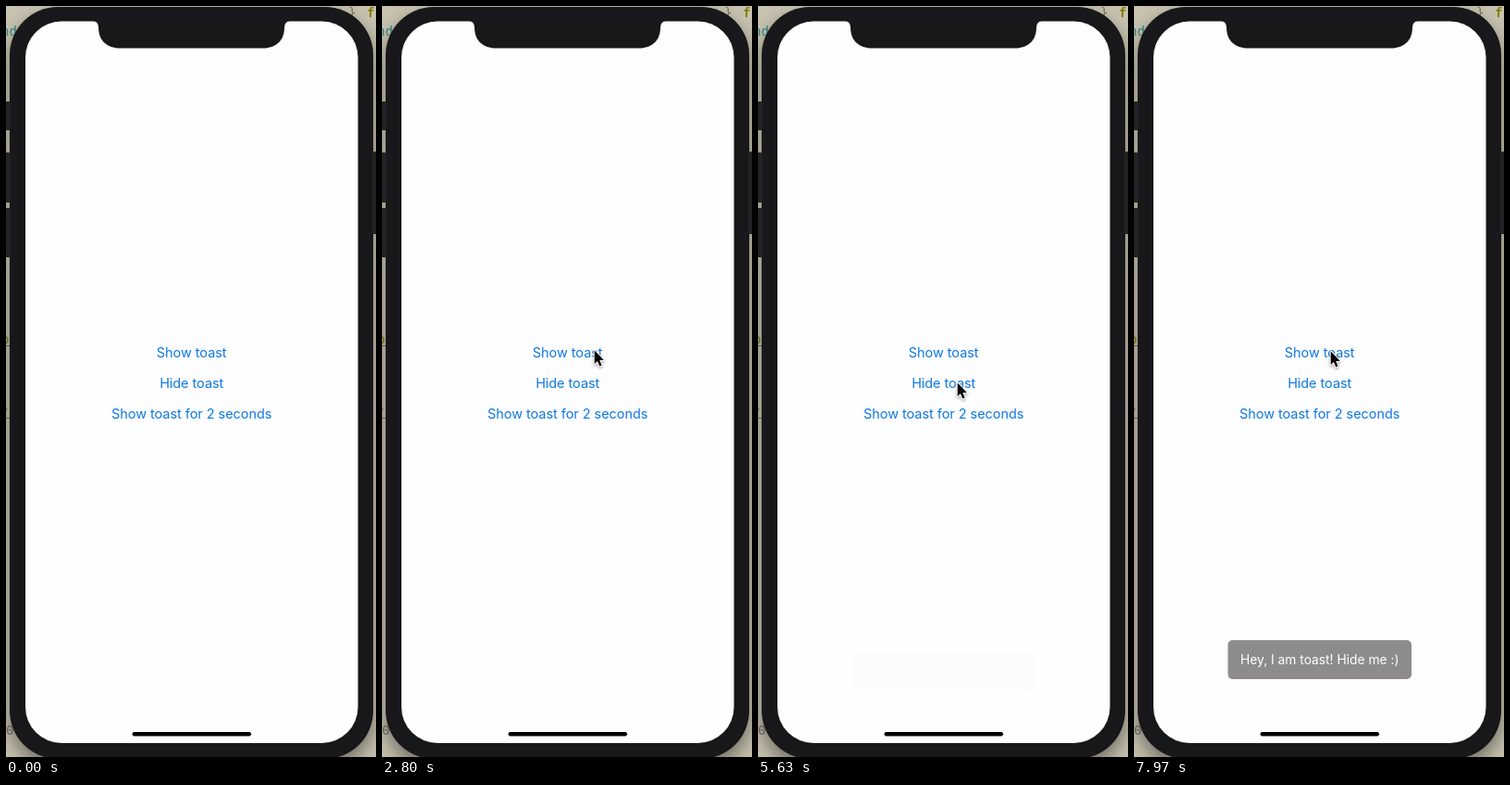
An HTML page with a canvas for the animation above (8000 ms loop, 400 by 810 pixels).

```html
<!DOCTYPE html>
<html lang="en">
<head>
<meta charset="utf-8">
<title>Toast demo</title>
<style>
  html, body { margin: 0; width: 100%; height: 100%; overflow: hidden; background: #c8c3b0; }
  canvas { display: block; width: 400px; height: 810px; }
</style>
</head>
<body>
<canvas id="stage"></canvas>
<script>
const W = 400, H = 810, LOOP = 8000, FADE = 350;
const BEZEL = '#18171a', BLUE = '#0b78e3', SCREEN = '#fefdff';
const SANS = 'Inter, Roboto, sans-serif', MONO = '"DejaVu Sans Mono", monospace';

const canvas = document.getElementById('stage');
const ctx = canvas.getContext('2d');
const dpr = window.devicePixelRatio || 1;
canvas.width = W * dpr;
canvas.height = H * dpr;

const buttons = [
  { label: 'Show toast', y: 378.7, clicks: [2940, 7000] },
  { label: 'Hide toast', y: 411.6, clicks: [5300] },
  { label: 'Show toast for 2 seconds', y: 444.5, clicks: [] }
];

// Pointer stops: time, x, y
const path = [
  [1230, 400, 471], [1640, 283, 399], [1830, 266, 381], [2150, 255, 376],
  [2700, 229, 372], [4300, 229, 372], [4950, 215, 407], [5900, 215, 407],
  [6570, 213, 386], [6850, 212, 373], [LOOP, 212, 373]
];

const clamp = v => Math.min(1, Math.max(0, v));
const smooth = v => { const k = clamp(v); return k * k * (3 - 2 * k); };
const mix = (a, b, k) => a + (b - a) * k;

function box(x, y, w, h, r, fill) {
  ctx.fillStyle = fill;
  ctx.beginPath();
  ctx.roundRect(x, y, w, h, r);
  ctx.fill();
}

function text(str, x, y, font, color, align = 'left') {
  ctx.font = font;
  ctx.fillStyle = color;
  ctx.textAlign = align;
  ctx.fillText(str, x, y);
}

function backdrop() {
  ctx.fillStyle = '#c8c3b0';
  ctx.fillRect(0, 0, W, H);
  text('nd', -5, 32, '14px ' + MONO, '#2f8580');
  text('}', 370, 12, '14px ' + MONO, '#77766a');
  text('f', 390, 12, 'bold 14px ' + MONO, '#858000');
  text('0', 0, 786, '14px ' + MONO, '#75746b');
  text('o', -5, 364, '14px ' + MONO, '#858000');
  text(',', -4, 436, '14px ' + MONO, '#858000');
  box(0, 366, 5, 1, 0, '#77704a');
  box(0, 444, 5, 1, 0, '#77704a');
}

function phone() {
  ctx.save();
  ctx.shadowColor = 'rgba(0,0,0,0.45)';
  ctx.shadowBlur = 20 * dpr;
  ctx.shadowOffsetY = 9 * dpr;
  box(4, 1, 393, 811, 52, BEZEL);
  ctx.restore();

  for (const [y, h] of [[103, 31], [158, 54], [218, 53]]) box(-4, y, 9, h, 1, '#232225');
  box(396, 157, 8, 89, 1, '#232225');

  box(21, 16.5, 359.5, 778.5, 39, SCREEN);
  notch();
  box(136.5, 783, 128.5, 4.5, 2.25, '#000');
}

function notch() {
  ctx.fillStyle = BEZEL;
  ctx.beginPath();
  ctx.moveTo(94, 16);
  ctx.quadraticCurveTo(100, 17, 100, 23);
  ctx.bezierCurveTo(100, 37, 109, 45.5, 123, 45.5);
  ctx.lineTo(278, 45.5);
  ctx.bezierCurveTo(292, 45.5, 301, 37, 301, 23);
  ctx.quadraticCurveTo(301, 17, 307, 16);
  ctx.closePath();
  ctx.fill();
}

// Dims on press, then fades back after release
function pressAlpha(t, release) {
  if (t < release - 110 || t > release + FADE) return 1;
  if (t < release) return 0.2;
  return mix(0.2, 1, smooth((t - release) / (FADE - 50)));
}

function drawButtons(t) {
  for (const b of buttons) {
    ctx.globalAlpha = Math.min(1, ...b.clicks.map(c => pressAlpha(t, c)));
    text(b.label, 200.7, b.y, '14.4px ' + SANS, BLUE, 'center');
  }
  ctx.globalAlpha = 1;
}

function drawToast(t) {
  const first = smooth((t - 2940) / FADE);
  const hide = smooth((t - 5310) / FADE);
  const again = smooth((t - 6990) / FADE);
  const shown = first - hide + again;
  if (shown <= 0) return;
  const drop = t < 5000 ? 0 : 13 * (1 - shown);
  ctx.globalAlpha = shown;
  box(101.5, 684 + drop, 198.5, 42, 5, '#8e8b8e');
  text('Hey, I am toast! Hide me :)', 200.7, 710.4 + drop, '13.8px ' + SANS, '#fff', 'center');
  ctx.globalAlpha = 1;
}

function drawPointer(t) {
  if (t < path[0][0]) return;
  const i = path.findIndex(p => p[0] > t);
  const [t0, x0, y0] = path[i - 1], [t1, x1, y1] = path[i];
  const k = (t - t0) / (t1 - t0);
  const e = i < 3 ? k : smooth(k);
  ctx.save();
  ctx.translate(mix(x0, x1, e) + 0.7, mix(y0, y1, e) - 0.5);
  const arrow = new Path2D('M0 0V14.4L3.2 11.5L5.6 17L7.9 16L5.6 10.6H10.2Z');
  ctx.lineJoin = 'round';
  ctx.lineWidth = 2;
  ctx.strokeStyle = '#fff';
  ctx.shadowColor = 'rgba(0,0,0,0.35)';
  ctx.shadowBlur = 3 * dpr;
  ctx.shadowOffsetY = 1.5 * dpr;
  ctx.stroke(arrow);
  ctx.shadowColor = 'transparent';
  ctx.fillStyle = '#000';
  ctx.fill(arrow);
  ctx.restore();
}

function frame() {
  const t = performance.now() % LOOP;
  ctx.setTransform(dpr, 0, 0, dpr, 0, 0);
  backdrop();
  phone();
  drawButtons(t);
  drawToast(t);
  drawPointer(t);
  requestAnimationFrame(frame);
}
frame();
</script>
</body>
</html>
```
